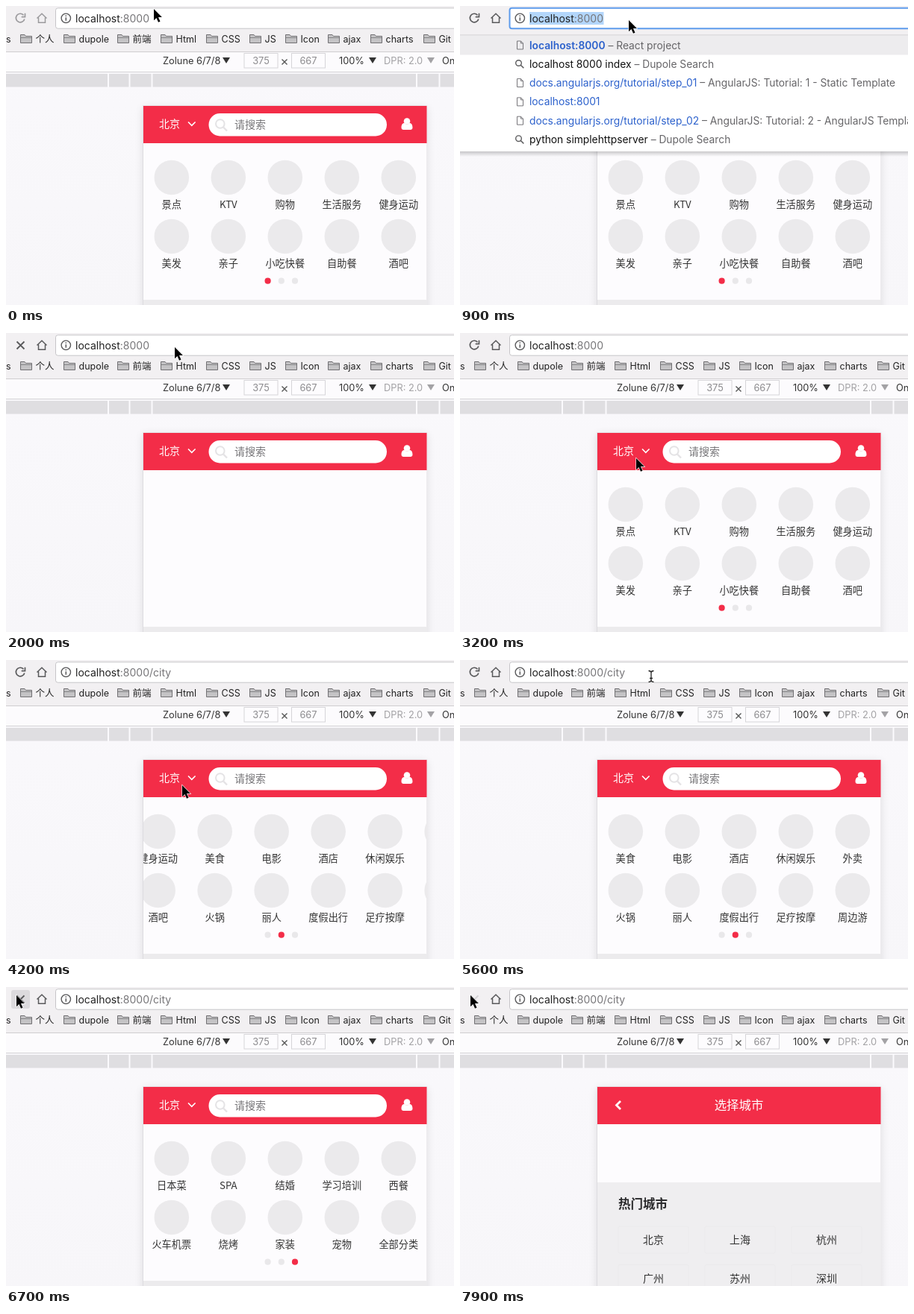
Recreate the animation shown at these times as an HTML page. Size 600 by 401 pixels, loop 8 s.

```html
<!DOCTYPE html>
<html lang="zh-CN">
<head>
<meta charset="utf-8">
<title>City picker demo</title>
<style>
html, body { margin: 0; width: 100%; height: 100%; overflow: hidden; background: #f9f8fb; }
svg { display: block; width: 100%; height: 100%; }
text { font-family: Inter, "Noto Sans CJK SC", "Noto Sans CJK", sans-serif; white-space: pre; }
.cn { font-family: "Noto Sans CJK SC", "Noto Sans CJK", sans-serif; }
.mid { text-anchor: middle; }
</style>
</head>
<body>
<svg id="stage" viewBox="0 0 600 401">
  <defs>
    <clipPath id="screen"><rect x="184" y="134" width="379.5" height="267"/></clipPath>
    <linearGradient id="desk" x2="0" y2="1"><stop stop-color="#faf9fc"/><stop offset="1" stop-color="#f7f6f9"/></linearGradient>
    <linearGradient id="fade" x2="0" y2="1"><stop stop-color="#000" stop-opacity=".2"/><stop offset="1" stop-color="#000" stop-opacity="0"/></linearGradient>
    <filter id="soft" x="-10%" y="-10%" width="120%" height="120%"><feGaussianBlur stdDeviation="6"/></filter>
  </defs>
</svg>
<script>
const LOOP = 8000, STEP = 100, RED = '#f32d48', INK = '#5a5a5c';
const stage = document.getElementById('stage');

function add(parent, tag, attrs = {}, content) {
  const el = document.createElementNS('http://www.w3.org/2000/svg', tag);
  for (const k in attrs) el.setAttribute(k, attrs[k]);
  if (content !== undefined) el.textContent = content;
  return parent.appendChild(el);
}
const group = (parent, attrs) => add(parent, 'g', attrs);
const rect = (p, x, y, width, height, fill, more) => add(p, 'rect', { x, y, width, height, fill, ...more });
const circle = (p, cx, cy, r, fill, more) => add(p, 'circle', { cx, cy, r, fill, ...more });
const path = (p, d, fill, more) => add(p, 'path', { d, fill, ...more });
const line = (p, d, stroke, width, more) => path(p, d, 'none', { stroke, 'stroke-width': width, ...more });
const label = (p, x, y, size, fill, str, more) => add(p, 'text', { x, y, 'font-size': size, fill, ...more }, str);
const show = (el, on) => el.setAttribute('visibility', on ? 'visible' : 'hidden');
const triangle = (p, x, fill) => path(p, `M${x} 69h10l-5 8z`, fill);

// Phone page
rect(stage, 0, 0, 600, 401, 'url(#desk)');
rect(stage, 183, 136, 381, 290, '#000', { opacity: .1, filter: 'url(#soft)' });
rect(stage, 183, 133.5, 381, 290, '#dddce0');
const phone = group(stage, { 'clip-path': 'url(#screen)' });
rect(phone, 184, 134, 380, 267, '#fdfcfe');
const home = group(phone), city = group(phone);

rect(home, 183, 134, 381, 50, RED);
label(home, 205, 163, 14, '#fff', '北京', { class: 'cn' });
line(home, 'M244 155.5l4.8 4.8 4.8-4.8', '#fff', 1.6);
rect(home, 271.5, 144, 238.5, 30.5, '#fff', { rx: 15 });
circle(home, 286.8, 158, 5.8, 'none', { stroke: '#e4e3e5', 'stroke-width': 2 });
line(home, 'M291 162.5l5 5', '#e4e3e5', 2.4);
label(home, 306, 164, 14, '#757477', '请搜索', { class: 'cn' });
circle(home, 537, 154.5, 4.3, '#fff');
path(home, 'M529.5 163c0-4 1.8-6 4-6q3.500 3 7 0c2.200 0 4 2 4 6q0 3-3 3h-9q-3 0-3-3z', '#fff');
rect(home, 184, 394, 380, 7, '#ecebed');

const menu = group(home), strip = group(menu);
const pages = [
  '景点 KTV 购物 生活服务 健身运动 美发 亲子 小吃快餐 自助餐 酒吧',
  '美食 电影 酒店 休闲娱乐 外卖 火锅 丽人 度假出行 足疗按摩 周边游',
  '日本菜 SPA 结婚 学习培训 西餐 火车机票 烧烤 家装 宠物 全部分类'
];
pages.forEach((names, page) => names.split(' ').forEach((name, i) => {
  const x = 221.8 + page * 380 + i % 5 * 76, y = 230 + (i > 4 ? 79 : 0);
  circle(strip, x, y, 23.3, '#ebeaec');
  label(strip, x, y + 40.5, 13.2, '#333', name, { class: 'cn mid' });
}));
const dots = [350.6, 368.8, 387].map(x => circle(menu, x, 368.7, 4.1, '#e9e8ea'));

rect(city, 183, 134, 381, 50, RED);
line(city, 'M215 153l-5.500 5.500 5.500 5.500', '#fff', 2.8);
label(city, 373.500, 164.3, 16.400, '#fff', '选择城市', { class: 'cn mid', 'font-weight': 500 });
rect(city, 183, 262, 381, 140, '#efeef0');
label(city, 212, 297, 16.500, '#2b2b2d', '热门城市', { class: 'cn', 'font-weight': 700 });
'北京 上海 杭州 广州 苏州 深圳'.split(' ').forEach((name, i) => {
  const x = 259 + i % 3 * 116, y = 321 + (i > 2 ? 51.500 : 0);
  rect(city, x - 47, y, 94, 36, 'none', { stroke: '#ebeaec', rx: 2 });
  label(city, x, y + 23, 14, '#333', name, { class: 'cn mid' });
});

// Device toolbar
rect(stage, 0, 61, 600, 28, '#fcfbfd');
rect(stage, 0, 61, 600, 1, '#cfcdd0');
label(stage, 210, 78, 12.8, '#333', 'Zolune 6/7/8');
triangle(stage, 290, '#333');
[[319, '375'], [382.5, '667']].forEach(([x, n]) => {
  rect(stage, x, 63.500, 45, 19.500, '#fdfcfe', { stroke: '#d6d5d8' });
  label(stage, x + 22.500, 78, 12.800, '#8c8b8e', n, { class: 'mid' });
});
line(stage, 'M369.500 71.500l7 7m0-7l-7 7', '#555', 1.400);
label(stage, 446, 78, 12.8, '#333', '100%');
triangle(stage, 486, '#333');
label(stage, 506, 78, 12.8, '#a3a2a5', 'DPR: 2.0');
triangle(stage, 564, '#a3a2a5');
label(stage, 584, 78, 12.8, '#333', 'Online');
rect(stage, 0, 88, 600, 1, '#d4d3d6');
rect(stage, 0, 89, 600, 20, '#f7f6f9');
rect(stage, 0, 91, 600, 17.500, '#dfdee1');
[136, 164.500, 194.500, 549, 579.500].forEach(x => rect(stage, x, 90, 2, 19, '#fbfafd'));

// Browser bars
rect(stage, 0, 0, 600, 61, '#f2f0f2');
label(stage, 0, 49, 12.5, '#222', 's');
[[19, '个人'], [77, 'dupole'], [149, '前端'], [207, 'Html'], [268, 'CSS'], [326, 'JS'],
 [374, 'Icon'], [431, 'ajax'], [488, 'charts'], [559, 'Git']].forEach(([x, name]) => {
  path(stage, `M${x + .5} 49.500v-11h5.500l1.500 2h8v9z`, '#c4c3c5', { stroke: '#727174' });
  line(stage, `M${x + 1} 42.500h14`, '#727174', .8);
  label(stage, x + 20.500, 49, 12.500, '#222', name);
});

// Suggestions
const list = group(stage);
rect(list, 0, 195, 600, 7, 'url(#fade)');
rect(list, 0, 33, 600, 6, '#f2f0f2');
rect(list, 0, 39, 600, 156, '#fff');
rect(list, 0, 39, 600, 26.500, '#edecee');
rect(list, 0, 38.500, 600, .8, '#cdccd0');
const BLUE = '#2c61cc', GREY = '#666568';
[['localhost:8000', 'React project', 'bold'],
 ['localhost 8000 index', 'Dupole Search', 'find'],
 ['docs.angularjs.org/tutorial/step_01', 'AngularJS: Tutorial: 1 - Static Template'],
 ['localhost:8001', ''],
 ['docs.angularjs.org/tutorial/step_02', 'AngularJS: Tutorial: 2 - AngularJS Templates'],
 ['python simplehttpserver', 'Dupole Search', 'find']].forEach(([main, note, kind], i) => {
  const y = 57.500 + i * 25.300;
  if (kind === 'find') {
    circle(list, 78.500, y - 6.300, 3.800, 'none', { stroke: INK, 'stroke-width': 1.400 });
    line(list, `M81.300 ${y - 3.500}l4 4`, INK, 1.600);
  } else {
    line(list, `M76.500 ${y - 10.500}h5l3 3v8h-8zM81.500 ${y - 10.500}v3h3`, '#77767a', 1);
  }
  const row = label(list, 93, y, 13.800, kind === 'find' ? '#111' : BLUE);
  add(row, 'tspan', { 'font-weight': kind === 'bold' ? 600 : 400 }, main);
  if (note) add(row, 'tspan', { fill: GREY }, ' – ' + note);
});

// Address bar
const box = rect(stage, 66.500, 2.800, 560, 27.400, '#fff', { rx: 3 });
circle(stage, 80.300, 16.300, 6.200, 'none', { stroke: INK, 'stroke-width': 1.400 });
line(stage, 'M80.300 15.300v4.500M80.300 12.500v1.600', INK, 1.500);
const picked = rect(stage, 93, 8, 99.500, 17, '#b3d6fb');
const url = label(stage, 93, 21.500, 14, '#222', 'localhost');
const tail = add(url, 'tspan', { fill: '#777679' });

const hover = rect(stage, 7, 4, 25, 25, '#dcdadd', { rx: 3 });
const reload = line(stage, 'M23.500 12.200a5.800 5.800 0 1 0 1.300 5.300M25.500 9.800v4.800h-4.800', INK, 1.700);
const stop = line(stage, 'M14.500 11.500l10 10m0-10l-10 10', INK, 1.800);
const house = line(stage, 'M41.500 16.500l6.500-6.300 6.500 6.300M43.500 15.500v6.800h9v-6.800', INK, 1.500);

// Pointers
const arrow = path(stage, 'M0 0v15.200l3.500-3.200 2.500 5.800 2.500-1.100-2.500-5.600h4.900z', '#000',
  { stroke: '#fff', 'stroke-width': 1.200, 'paint-order': 'stroke' });
const beam = group(stage);
['#fff', '#222'].forEach((c, i) =>
  line(beam, 'M-3.500 -7.500q3 0 3.500 2q.5 -2 3.500 -2M0 -5.500v11M-3.500 7.500q3 0 3.500 -2q.5 2 3.500 2M-2 2.500h4', c, i ? 1.300 : 3));

const track = [
  [0, 198, 4], [200, 198, 4], [600, 226, 19], [2700, 226, 19], [3100, 236, 168], [4600, 236, 168],
  [5300, 252, 46], [5600, 256, 22], [5900, 256, 22], [6300, 20, 13], [6400, 14, 11], [LOOP, 14, 11]
];
function pointerAt(t) {
  const i = track.findIndex(k => k[0] > t), [t0, x0, y0] = track[i - 1], [t1, x1, y1] = track[i];
  const u = (t - t0) / (t1 - t0), e = u * u * (3 - 2 * u);
  return [x0 + (x1 - x0) * e, y0 + (y1 - y0) * e];
}

// CSS "ease" curve, solved by bisection
function ease(x) {
  if (x <= 0 || x >= 1) return x <= 0 ? 0 : 1;
  let lo = 0, hi = 1, s;
  const curve = (a, b) => 3 * (1 - s) * (1 - s) * s * a + 3 * (1 - s) * s * s * b + s * s * s;
  for (let i = 0; i < 20; i++) {
    s = (lo + hi) / 2;
    if (curve(.25, .25) < x) lo = s; else hi = s;
  }
  return curve(.1, 1);
}

const during = (t, a, b) => t >= a && t < b;
const SLIDES = [4035, 6335];

function render(t) {
  const focus = during(t, 500, 1700), open = during(t, 700, 1700);
  show(list, open);
  show(picked, focus);
  box.setAttribute('stroke', focus ? '#5e9cec' : '#c6c5c8');
  box.setAttribute('stroke-width', focus ? 2 : 1);
  tail.textContent = t < 3900 ? ':8000' : ':8000/city';

  const loading = during(t, 1700, 2100) || t >= 6600;
  show(reload, !loading);
  show(stop, loading);
  show(hover, during(t, 6400, 7500));
  stop.setAttribute('stroke', t >= 7500 ? '#d3d2d5' : INK);
  const icon = t < 500 ? '#9b9a9d' : INK;
  reload.setAttribute('stroke', icon);
  house.setAttribute('stroke', icon);

  home.style.display = t < 1700 || during(t, 1800, 6800) ? '' : 'none';
  menu.style.display = during(t, 1700, 2035) ? 'none' : '';
  city.style.display = t >= 7100 ? '' : 'none';

  const shift = SLIDES.reduce((sum, s) => sum + ease((t - s) / 300), 0) * 380;
  strip.setAttribute('transform', `translate(${-shift} 0)`);
  const active = SLIDES.filter(s => t >= s).length;
  dots.forEach((d, i) => d.setAttribute('fill', i === active ? RED : '#e9e8ea'));

  const [x, y] = pointerAt(t), typing = during(t, 5500, 6000);
  show(arrow, !typing);
  show(beam, typing);
  for (const p of [arrow, beam]) p.setAttribute('transform', `translate(${x} ${y})`);
}

const start = performance.now();
function tick() {
  const t = (performance.now() - start) % LOOP;
  render(Math.floor(t / STEP) * STEP);
  requestAnimationFrame(tick);
}
tick();
</script>
</body>
</html>
```
